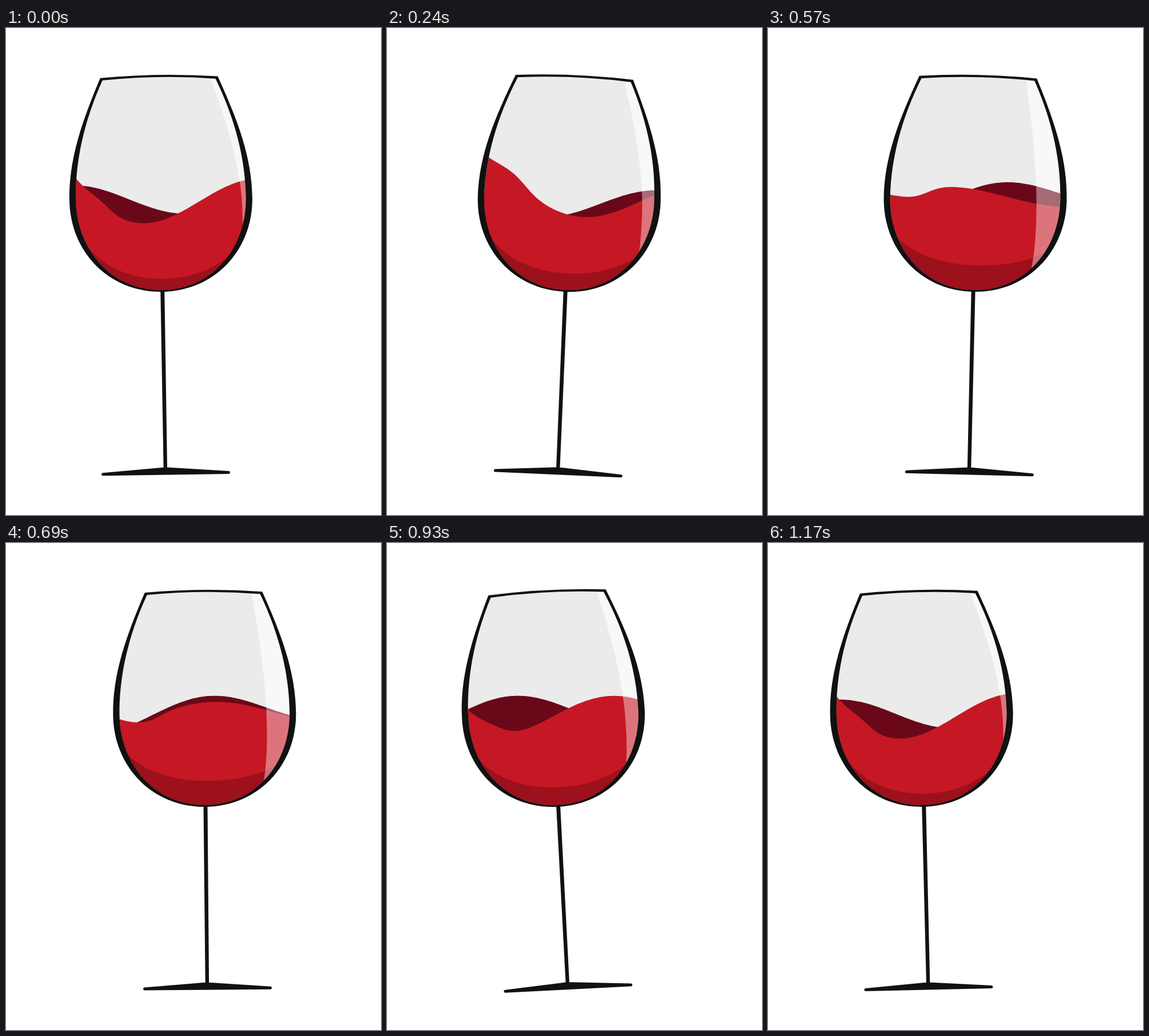
These frames come from a looping animation (656x853 px, 1.2 s). An HTML page with a canvas:

```html
<!DOCTYPE html>
<html lang="en">
<head>
<meta charset="utf-8">
<title>Swirling wine</title>
<style>
  html, body { margin: 0; width: 100%; height: 100%; overflow: hidden; background: #fff; }
  canvas { display: block; }
</style>
</head>
<body>
<canvas id="stage" width="656" height="853"></canvas>
<script>
const ctx = document.getElementById('stage').getContext('2d');
const LOOP = 1200, STEP = 30, PIVOT_Y = 433, HALF_WIDTH = 148;
const INK = '#101111';

// Bowl contours, relative to the pivot
const OUTER = { rimX: 102.8, rimY: -347, arch: -355, shoulderX: 136.5, side: 160,
                upperY: -205, lowerY: -42, baseX: 92, bottom: 29 };
const INNER = { rimX: 98.9, rimY: -342.8, arch: -351.5, shoulderX: 133, side: 148.8,
                upperY: -200, lowerY: -49, baseX: 91, bottom: 26 };

const cosDeg = deg => Math.cos(deg * Math.PI / 180);

// Surface heights at s = -1 (left wall) to 1 (right wall), for a loop angle in degrees.
// The front wave travels right and splashes at the left wall; the back wave travels left.
function frontWave(s, angle) {
  const bump = Math.exp(-(((s + 0.7) / 0.22) ** 2));
  const splash = 5.5 * (1 - Math.tanh(6 * (s + 0.5)));
  const level = 309 - 13 * s - 29 * s * s + 22 * s ** 3 - 4 * bump;
  const swing = 30 - 7.5 * s + 3 * s * s;
  const phase = 20 + 133 * s - 14 * bump;
  return level + swing * cosDeg(angle - phase) + splash * cosDeg(2 * angle);
}

function backWave(s, angle) {
  const level = 298 - 3 * s + 4 * s * s;
  const swing = 31 - 6 * s - 6 * s * s;
  return level + swing * cosDeg(angle - 46 + 115 * s);
}

function fillWave(wave, angle, centerX, color) {
  ctx.beginPath();
  ctx.moveTo(centerX - 170, 500);
  for (let s = -1.04; s <= 1.05; s += 0.02) {
    ctx.lineTo(centerX + s * HALF_WIDTH, wave(s, angle));
  }
  ctx.lineTo(centerX + 170, 500);
  ctx.fillStyle = color;
  ctx.fill();
}

function bowlPath(b) {
  ctx.moveTo(-b.rimX, b.rimY);
  ctx.quadraticCurveTo(0, b.arch, b.rimX, b.rimY);
  ctx.bezierCurveTo(b.shoulderX, -270, b.side, b.upperY, b.side, -134);
  ctx.bezierCurveTo(b.side, b.lowerY, b.baseX, b.bottom, 0, b.bottom);
  ctx.bezierCurveTo(-b.baseX, b.bottom, -b.side, b.lowerY, -b.side, -134);
  ctx.bezierCurveTo(-b.side, b.upperY, -b.shoulderX, -270, -b.rimX, b.rimY);
  ctx.closePath();
}

function fillSediment(glare) {
  const low = 10.5 - 0.68 * glare, pull = (8 * low + 118) / 6;
  ctx.beginPath();
  ctx.moveTo(-140, -70);
  ctx.bezierCurveTo(-90, pull, 70, pull, 133, -48);
  ctx.lineTo(170, 60);
  ctx.lineTo(-170, 60);
  ctx.fillStyle = '#9c111b';
  ctx.fill();
}

function fillGlare(glare) {
  const top = 90 - 0.15 * glare, mid = INNER.side - glare;
  ctx.beginPath();
  ctx.moveTo(top - 1, -352);
  ctx.lineTo(top, -345);
  ctx.bezierCurveTo((top + mid) / 2, -275, mid, -185, mid, -110);
  ctx.quadraticCurveTo(mid + 1, -55, mid - 7, -10);
  ctx.lineTo(mid - 7, 40);
  ctx.lineTo(200, 40);
  ctx.lineTo(200, -360);
  ctx.fillStyle = 'rgba(255,255,255,0.4)';
  ctx.fill();
}

function polygon(points) {
  ctx.beginPath();
  points.forEach(([x, y]) => ctx.lineTo(x, y));
  ctx.closePath();
  ctx.fill();
}

function drawInk() {
  ctx.fillStyle = ctx.strokeStyle = INK;
  ctx.beginPath();
  bowlPath(OUTER);
  bowlPath(INNER);
  ctx.fill('evenodd');
  polygon([[-3.2, 27], [3.8, 27], [3.7, 341], [-2.7, 341]]);
  polygon([[-109, 347], [-6, 339.5], [7, 339.5], [111, 347.3]]);
  ctx.lineWidth = 5;
  ctx.lineJoin = 'round';
  ctx.stroke();
}

function draw(t) {
  const angle = t / LOOP * 360, cos = cosDeg(angle), sin = cosDeg(angle - 90);
  const x = 315.6 - 42.6 * cos + 11.2 * sin;
  const tilt = (2.85 * sin - 0.9 * cos) * Math.PI / 180;
  const glare = 25 - 17.5 * cos - cosDeg(2 * angle);
  const bowlX = x + 133 * Math.sin(tilt);
  const toGlass = () => {
    ctx.translate(x, PIVOT_Y);
    ctx.rotate(tilt);
  };

  ctx.setTransform(1, 0, 0, 1, 0, 0);
  ctx.fillStyle = '#fff';
  ctx.fillRect(0, 0, 656, 853);

  ctx.save();
  toGlass();
  ctx.beginPath();
  bowlPath(INNER);
  ctx.fillStyle = '#ebebeb';
  ctx.fill();
  ctx.clip();
  fillGlare(glare);
  ctx.setTransform(1, 0, 0, 1, 0, 0);
  fillWave(backWave, angle, bowlX, '#6a0819');
  fillWave(frontWave, angle, bowlX, '#c51824');
  toGlass();
  fillSediment(glare);
  fillGlare(glare);
  ctx.restore();

  toGlass();
  drawInk();
}

function tick() {
  draw(Math.floor(performance.now() % LOOP / STEP) * STEP);
  requestAnimationFrame(tick);
}
tick();
</script>
</body>
</html>
```
